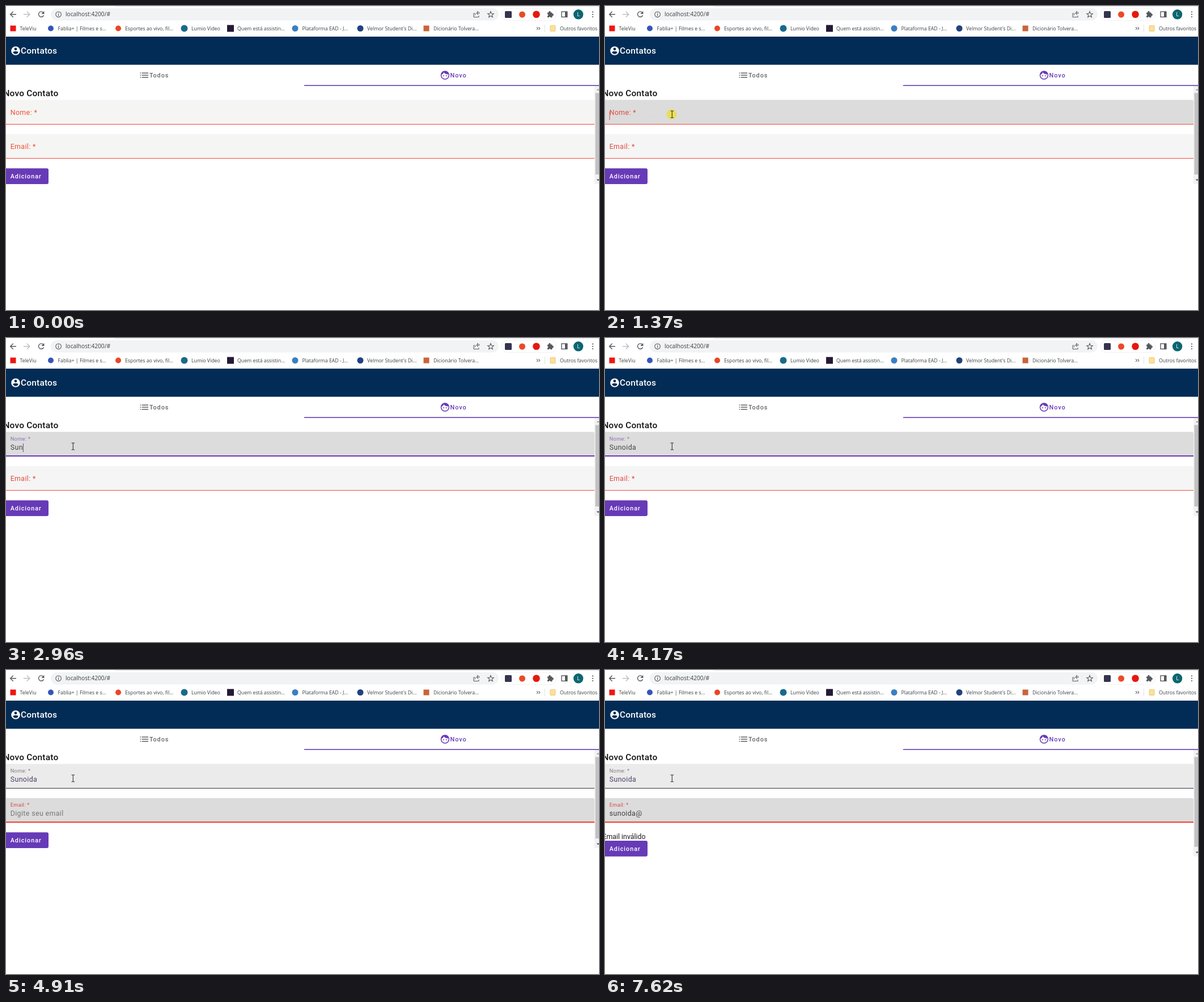
An HTML page that plays this animation: 1046 by 536 pixels, repeating every 8 s.

```html
<!DOCTYPE html>
<html lang="pt-BR">
<head>
<meta charset="utf-8">
<title>Contatos</title>
<style>
  html, body { margin: 0; width: 100%; height: 100%; overflow: hidden; background: #fff; }
  svg { display: block; width: 1046px; height: 536px; }
  text { font-family: Roboto, sans-serif; white-space: pre; }
  .ui text, .ui { font-family: "Open Sans", "Noto Sans", sans-serif; }
  .url { font-size: 10.2px; fill: #3c4043; }
  .marks text { font-size: 8.75px; fill: #3c4043; }
  .line { fill: none; stroke: #55585c; stroke-width: 1.4; }
  .title { font-size: 15.48px; font-weight: 500; letter-spacing: .0125em; }
  .tab { font-size: 10.84px; font-weight: 500; letter-spacing: .0893em; }
  .field { font-size: 12.38px; letter-spacing: .03125em; }
  .menu text { font-size: 9.5px; fill: #333; }
</style>
</head>
<body>
<svg viewBox="0 0 1046 536">
  <!-- browser bar -->
  <g class="ui">
    <path d="M192 .5H1046" stroke="#e3e5e8"/>
    <rect x="79" y="4" width="790" height="21.5" rx="10.75" fill="#f1f3f4"/>
    <rect x="874" y="4" width="97" height="21.5" rx="10.75" fill="none" stroke="#f1f1f3"/>
    <path class="line" d="M18 14.8H8M12.7 9.8l-5 5 5 5"/>
    <path class="line" d="M31 14.8h10M36.8 9.8l5 5-5 5" style="stroke:#bcbec1"/>
    <path class="line" d="M66 11.8a4.7 4.7 0 1 0 .6 4.4"/>
    <path d="M67.4 9v5h-5z" fill="#55585c"/>
    <circle class="line" cx="92.6" cy="14.8" r="4.8" style="stroke-width:1.1"/>
    <path d="M92.6 14v3.6M92.6 11.7v1.3" stroke="#55585c" stroke-width="1.2"/>
    <text class="url" x="105" y="18.4">localhost:4200/#</text>
    <path class="line" d="M827 13h-2v6.6h9V17M827 16.5c.5-3 2.5-4.500 5.500-4.500M831.500 9.500l3.800 2.700-3.800 2.700z" style="stroke-width:1"/>
    <path id="star" class="line" style="stroke-width:1.1"/>
    <rect x="880" y="9" width="12" height="12" rx="1.5" fill="#34344f"/>
    <circle cx="910.5" cy="15" r="5.5" fill="#ea4a27"/>
    <circle cx="935.5" cy="14.8" r="6.3" fill="#e5180f"/>
    <g fill="#55585c">
      <rect x="955" y="11.5" width="8.600" height="8.800" rx="1"/>
      <circle cx="959" cy="11" r="1.900"/><circle cx="964" cy="15.500" r="1.900"/>
      <circle cx="1035" cy="10.6" r="1.1"/><circle cx="1035" cy="14.8" r="1.1"/><circle cx="1035" cy="19" r="1.1"/>
      <rect x="986" y="10" width="4.2" height="9.6"/>
    </g>
    <circle cx="955" cy="16" r="1.4" fill="#fff"/><circle cx="959" cy="20.300" r="1.4" fill="#fff"/>
    <rect class="line" x="980" y="10" width="9.8" height="9.4"/>
    <circle cx="1009.6" cy="14.8" r="8.7" fill="#0b6670"/>
    <text x="1009.6" y="18.2" font-size="9.5" fill="#fff" text-anchor="middle">L</text>
  </g>
  <g class="ui marks" id="marks">
    <path class="line" d="M936 37l2.300 2.500-2.300 2.500M939.500 37l2.300 2.500-2.300 2.500" style="stroke-width:1.1"/>
    <path d="M950.5 33v13" stroke="#e0e2e5"/>
    <rect x="960" y="34.5" width="9" height="10" rx="1" fill="#fce09a" stroke="#e9c978"/>
    <text x="977" y="42.7">Outros favoritos</text>
  </g>

  <!-- page header -->
  <rect y="54" width="1046" height="49.6" fill="#022c55"/>
  <circle cx="17" cy="79" r="7.8" fill="#fff"/>
  <circle cx="17" cy="75.900" r="2.4" fill="#022c55"/>
  <path d="M12.300 82.100c.1-3 9.300-3 9.400 0a5.600 5.600 0 0 1-9.400 0z" fill="#022c55"/>
  <text class="title" x="26" y="84.4" fill="#fff">Contatos</text>

  <path d="M236.500 118.200h1.600m1.500 0H251M236.500 122h1.600m1.500 0H251M236.500 125.800h1.600m1.500 0H251" stroke="#606060" stroke-width="1.5"/>
  <text class="tab" x="253" y="125.500" fill="#666">Todos</text>
  <g fill="#673ab7">
    <circle cx="774.4" cy="122" r="7" fill="none" stroke="#673ab7" stroke-width="1.5"/>
    <path d="M767.500 121.600c2.300-.7 3.900-2.300 4.700-4.500 1.800 2.500 5 3.800 8.600 3.100-.8-3.400-3.300-5.400-6.400-5.400-4 0-6.900 3-6.900 6.800z"/>
    <circle cx="772" cy="122.900" r="1"/><circle cx="776.700" cy="122.900" r="1"/>
    <text class="tab" x="783.5" y="125.500">Novo</text>
    <rect x="526" y="139.400" width="520" height="1.6"/>
  </g>

  <!-- form -->
  <text class="title" x="-4.6" y="158.500" fill="#111">Novo Contato</text>
  <g id="fields"></g>
  <text id="error" x="-4.600" y="297.700" font-size="12.38" fill="#1c1c1c">Email inválido</text>
  <g id="button">
    <rect x="-5" y="286.300" width="80" height="27.800" rx="3" fill="#673ab7"/>
    <text class="tab" x="7.700" y="303.900" fill="#fff">Adicionar</text>
  </g>
  <rect id="track" x="1038" y="141" width="8" fill="#f1f1f1"/>
  <rect id="thumb" x="1039.600" y="153.500" width="6.400" fill="#c1c1c1"/>
  <path d="M1041.800 149h5l-2.500-3z" fill="#a3a3a3"/>
  <path id="down" d="M1041.800 305.500h5l-2.500 3z" fill="#505050"/>

  <!-- suggestions -->
  <g id="menu" class="ui menu">
    <g style="filter:drop-shadow(0 1px 1.5px rgba(0,0,0,.35))">
      <path d="M87 209.500h7.500l6-5.500 6 5.500H146q3 0 3 3V380q0 3-3 3H87q-3 0-3-3V212.500q0-3 3-3z" fill="#fff"/>
    </g>
  </g>

  <!-- pointer -->
  <circle id="click" cx="117.5" cy="191" r="9" fill="#eedd3c"/>
  <g id="pointer">
    <path id="arrow" d="M0 0v12.500l2.900-2.700 2 4.600 1.900-.8-2-4.500h4z" fill="#fff" stroke="#222" stroke-width=".8"/>
    <path id="beam" d="M-2.700-6h2q.7 0 .7.800.1-.8.7-.8h2M0-5.500v11M-2.700 6h2q.7 0 .7-.8.1.8.7.8h2" fill="none" stroke="#222"/>
  </g>
</svg>
<script>
const LOOP = 8000, BLINK = 520;
const $ = id => document.getElementById(id);
const clamp = v => Math.max(0, Math.min(1, v));
const mix = (a, b, k) => a + (b - a) * k;
const ease = k => k * k * (3 - 2 * k);

function add(parent, tag, attrs, text) {
  const el = document.createElementNS("http://www.w3.org/2000/svg", tag);
  set(el, attrs);
  if (text) el.textContent = text;
  parent.appendChild(el);
  return el;
}
function set(el, attrs) {
  for (const key in attrs) el.setAttribute(key, attrs[key]);
}
const show = (el, on) => { el.style.visibility = on ? "visible" : "hidden"; };

// progress from a to b in n held steps
const stepped = (t, a, b, n) => t < a ? 0 : clamp(Math.floor((t - a) / (b - a) * n) / n);

// bookmarks: text x, label, icon centre, icon size, colour, round
[
  [24.5, "TeleViu", 12.5, 10, "#f01414", 0],
  [91.5, "Fablia+ | Filmes e s...", 79, 10, "#3456b8", 1],
  [210, "Esportes ao vivo, fil...", 198, 10, "#ea4526", 1],
  [327, "Lumio Video", 314.5, 12, "#196a8c", 1],
  [408, "Quem está assistin...", 396, 12, "#251a36", 0],
  [522.5, "Plataforma EAD - J...", 510, 11, "#3b7fc2", 1],
  [637, "Velmor Student's Di...", 625, 11, "#20427f", 1],
  [754, "Dicionário Tolvera...", 741.5, 10, "#c9643a", 0]
].forEach(([x, label, cx, size, fill, round]) => {
  add($("marks"), "rect", { x: cx - size / 2, y: 39.5 - size / 2, width: size, height: size, rx: round ? size / 2 : 0, fill });
  add($("marks"), "text", { x, y: 42.7 }, label);
});

const points = Array.from({ length: 10 }, (_, i) => {
  const r = i % 2 ? 2.4 : 5.6, a = (i / 5 - .5) * Math.PI;
  return `${855 + r * Math.cos(a)} ${15.2 + r * Math.sin(a)}`;
});
set($("star"), { d: `M${points.join("L")}z` });

["Ivel", "Dalmor", "Norbelo", "Marilopa", "Télio", "Gersilo"].forEach((name, i) =>
  add($("menu"), "text", { x: 93.5, y: 230.3 + i * 27.85 }, name));

function makeField(top, label, hint, value, focus, keys, origin) {
  const g = add($("fields"), "g", {});
  const box = "M0 0H1035q3 0 3 3V43.500H0z";
  return {
    value, focus, keys, origin, top,
    fill: add(g, "path", { d: box, transform: `translate(0 ${top})` }),
    base: add(g, "rect", { x: 0, y: top + 42.5, width: 1038, height: 1 }),
    ripple: add(g, "rect", { y: top + 41.5, height: 2 }),
    hint: add(g, "text", { class: "field", x: 7.7, y: top + 31.6, fill: "#777" }, hint),
    text: add(g, "text", { class: "field", x: 7.7, y: top + 31.6 }),
    label: add(g, "text", { class: "field" }, label),
    caret: add(g, "rect", { y: top + 20.5, width: 1, height: 15 })
  };
}
const RED = "#f44336", PURPLE = "#673ab7";
const nameField = makeField(165.5, "Nome: *", "Digite seu nome", "Sunoida",
  1370, [2560, 2760, 2960, 3110, 3310, 3510, 3640], 118);
const emailField = makeField(225.7, "Email: *", "Digite seu email", "sunoida@",
  4370, [5240, 5500, 5595, 5690, 5890, 5990, 6090, 7090], 519);

function drawField(f, t, look) {
  const typed = f.keys.filter(k => t >= k).length;
  const focused = t >= f.focus && t < look.blur;
  const lift = ease(clamp((t - f.focus + look.lead) / 150));

  set(f.fill, { fill: look.fill });
  set(f.base, { fill: look.base });
  const grow = ease(clamp((t - f.focus) / 180));
  const left = f.origin * (1 - grow);
  set(f.ripple, {
    x: left, width: mix(f.origin, 1038, grow) - left, fill: look.accent,
    opacity: 1 - stepped(t, look.blur, look.blur + 210, 3)
  });

  set(f.label, {
    transform: `translate(7.7 ${f.top + mix(26.2, 15, lift)}) scale(${mix(1, .75, lift)})`,
    fill: look.label
  });
  set(f.hint, { opacity: typed ? 0 : clamp((t - f.focus + look.lead * 2) / 150) });
  f.text.textContent = f.value.slice(0, typed);
  set(f.text, { fill: look.text });

  const last = typed ? f.keys[typed - 1] : f.focus;
  const width = typed ? f.text.getComputedTextLength() : 0;
  set(f.caret, { x: 7.7 + width, fill: look.caret });
  show(f.caret, focused && Math.floor((t - last) / BLINK) % 2 === 0);
}

function drawPointer(t) {
  const k = ease(stepped(t, 330, 1110, 11));
  const x = mix(538, 118.3, k), y = mix(410, 191, k);
  const overField = (y > 165 && y < 209) || (y > 226 && y < 269);
  set($("pointer"), { transform: `translate(${x} ${y})` });
  show($("arrow"), t >= 330 && !overField);
  show($("beam"), t >= 330 && overField);
  set($("click"), { opacity: t < 1370 ? 0 : .8 * (1 - stepped(t, 1370, 1630, 4)) });
}

function draw(t) {
  const idle = t < 1370, valid = t >= 2560, left = t >= 4370, invalid = t >= 5240;
  const restLabel = idle ? "#ef5030" : "#e2493f";

  drawField(nameField, t, {
    blur: 4370, lead: 0,
    fill: idle ? "#f5f5f4" : left ? "#ebebeb" : "#dcdcdc",
    base: valid ? "#35323d" : RED,
    accent: valid ? PURPLE : RED,
    label: t >= 4580 ? "#857c7c" : left ? "#87789a" : valid ? "#8b74b8" : restLabel,
    text: left ? "#4c4060" : "#444",
    caret: valid ? "#5e4a80" : "#e2493f"
  });
  drawField(emailField, t, {
    blur: LOOP, lead: 35,
    fill: left ? "#dcdcdc" : idle ? "#f5f5f4" : "#f5f5f5",
    base: RED, accent: RED,
    label: left ? "#d34d48" : restLabel,
    text: "#3e3e3e", caret: "#e2493f"
  });

  const shift = invalid ? 14.7 : 0;
  show($("error"), invalid);
  set($("button"), { transform: `translate(0 ${shift})` });
  set($("track"), { height: 173 + shift });
  set($("thumb"), { height: 143.5 + shift });
  set($("down"), { transform: `translate(0 ${shift})` });
  show($("menu"), t >= 1500 && !valid);
  drawPointer(t);
}

const start = performance.now();
function tick() {
  draw((performance.now() - start) % LOOP);
  requestAnimationFrame(tick);
}
tick();
</script>
</body>
</html>
```
